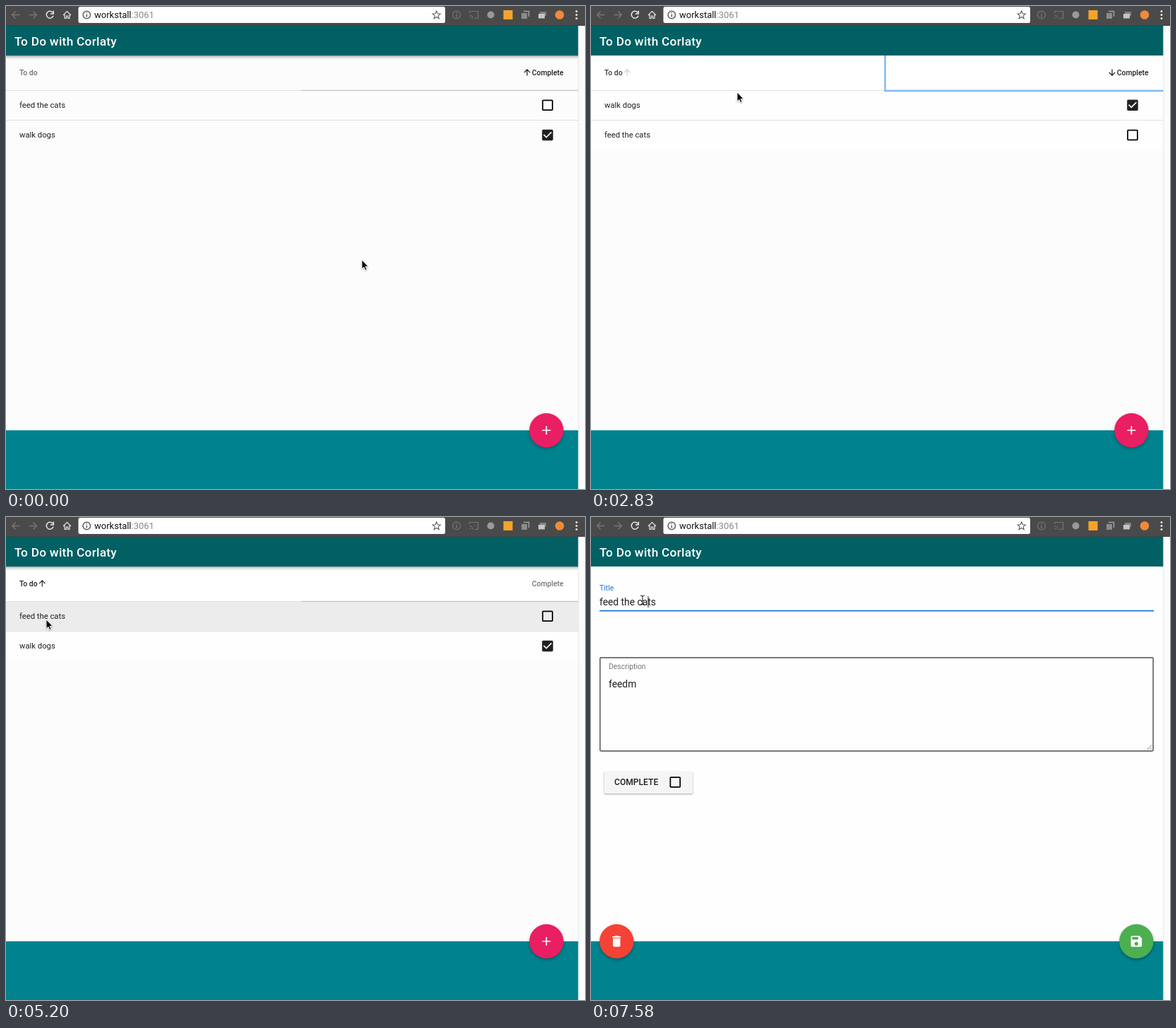
An HTML page that plays this animation: 820 by 683 pixels, repeating every 8 s.

```html
<!DOCTYPE html>
<html lang="en">
<head>
<meta charset="utf-8">
<title>To do list</title>
<style>
  html, body { margin: 0; width: 100%; height: 100%; overflow: hidden; background: #fcfcfc; }
  svg { display: block; width: 100%; height: 100%; }
  text { font-family: Roboto, Arial, sans-serif; fill: #212121; white-space: pre; }
  .cell { font-size: 11.25px; }
  .head { font-size: 10.4px; font-weight: 500; fill: #000; }
  .label { font-size: 10.4px; fill: #757575; }
  .input { font-size: 13.85px; }
  .line { fill: none; stroke-width: 1.5; }
  .fab { filter: drop-shadow(0 2px 2px rgba(0, 0, 0, .32)); }
</style>
</head>
<body>
<svg viewBox="0 0 820 683">
  <defs>
    <linearGradient id="shade" x2="0" y2="1">
      <stop stop-color="#000" stop-opacity=".38"/>
      <stop offset=".4" stop-color="#000" stop-opacity=".13"/>
      <stop offset="1" stop-color="#000" stop-opacity="0"/>
    </linearGradient>
    <g id="box"><path transform="translate(-10.4 -10.4) scale(.865)" d="M19 5v14H5V5h14m0-2H5c-1.1 0-2 .9-2 2v14c0 1.1.9 2 2 2h14c1.1 0 2-.9 2-2V5c0-1.1-.9-2-2-2z"/></g>
    <g id="ticked"><path transform="translate(-10.4 -10.4) scale(.865)" d="M19 3H5c-1.1 0-2 .9-2 2v14c0 1.1.9 2 2 2h14c1.1 0 2-.9 2-2V5c0-1.1-.9-2-2-2zm-9 14l-5-5 1.4-1.4L10 14.2l7.6-7.6L19 8l-9 9z"/></g>
    <path id="sort" d="M0 4.6V-4M-4.2 .2L0-4.1 4.2 .2" fill="none" stroke="#111" stroke-width="1.2"/>
  </defs>

  <rect width="820" height="683" fill="#fcfcfc"/>

  <g id="list">
    <rect id="headBack" y="70" width="811" height="50" fill="#fff"/>
    <rect id="rowsBack" y="120" width="811" height="84" fill="#fefefe"/>
    <rect id="hover1" y="120" width="811" height="41.5" fill="#ececec"/>
    <rect id="hover2" y="162" width="811" height="42" fill="#ececec"/>
    <path d="M0 119.5H811M0 161.5H811" stroke="#e0e0e0"/>
    <path d="M418 119.3H811" stroke="#bcbcbc"/>
    <text id="todoHead" class="head" x="19" y="98">To do</text>
    <use id="todoSort" href="#sort" x="0" y="0"/>
    <text id="doneHead" class="head" x="744.7" y="98">Complete</text>
    <use id="doneSort" href="#sort"/>
    <g id="cats"><text class="cell" x="19" y="144">feed the cats</text><use href="#box" x="767" y="140.2"/></g>
    <g id="dogs"><text class="cell" x="19" y="144">walk dogs</text><use href="#ticked" x="767" y="140.2" fill="#212121"/></g>
    <rect id="doneRing" x="416.5" y="60" width="400" height="60" fill="none" stroke="#82bcf6" stroke-width="2.6"/>
    <rect id="todoRing" x="-6" y="60" width="425.4" height="60.4" fill="none" stroke="#5f90ca" stroke-width="1.6"/>
    <rect id="shadow" y="70" width="811" height="6" fill="url(#shade)"/>
  </g>

  <g id="form">
    <rect y="70" width="811" height="530" fill="#fefefe"/>
    <text id="titleLabel" class="label" x="12" y="104">Title</text>
    <text class="input" x="12" y="125">feed the cats</text>
    <path d="M12 132.5H797" stroke="#707070"/>
    <path id="underline" stroke="#1976d2" stroke-width="1.8"/>
    <path id="caret" d="M81 112V128" stroke="#222"/>
    <rect x="12.8" y="198.8" width="783.4" height="132" rx="1.5" fill="none" stroke="#666" stroke-width="1.7"/>
    <text class="label" x="25" y="215">Description</text>
    <text class="input" x="25" y="241">feedm</text>
    <path d="M787.5 329L794 322.5M791.5 329L794 326.5" stroke="#777" stroke-width=".9"/>
    <rect x="18.5" y="360" width="125.5" height="31" rx="1.8" fill="#f5f5f5" style="filter:drop-shadow(0 1.5px 1.3px rgba(0,0,0,.35))"/>
    <text x="33" y="379.3" font-size="12.1" font-weight="500">COMPLETE</text>
    <use href="#box" x="119.3" y="375"/>
  </g>

  <rect y="28" width="811" height="42" fill="#006064"/>
  <text x="12" y="55.5" font-size="17.2" font-weight="500" letter-spacing=".3" style="fill:#fff">To Do with Corlaty</text>
  <rect y="600" width="811" height="83" fill="#00838f"/>
  <rect x="810.5" y="28" width="9.5" height="655" fill="#fcfcfc"/>
  <path d="M811 28V683" stroke="#e4e4e4"/>

  <g id="listButtons">
    <circle class="fab" cx="765.4" cy="600" r="24.2" fill="#e91e63"/>
    <path d="M759.4 600H771.4M765.4 594V606" stroke="#fff" stroke-width="1.7"/>
  </g>
  <g id="formButtons">
    <circle class="fab" cx="36.3" cy="600" r="24.2" fill="#f44336"/>
    <circle class="fab" cx="772.4" cy="600" r="24.2" fill="#4caf50"/>
    <path transform="translate(25.9 589.6) scale(.865)" fill="#fff" d="M6 19c0 1.1.9 2 2 2h8c1.1 0 2-.9 2-2V7H6v12zM19 4h-3.5l-1-1h-5l-1 1H5v2h14V4z"/>
    <path transform="translate(762 589.6) scale(.865)" fill="#fff" d="M17 3H5c-1.1 0-2 .9-2 2v14c0 1.1.9 2 2 2h14c1.1 0 2-.9 2-2V7l-4-4zm-5 16c-1.7 0-3-1.3-3-3s1.3-3 3-3 3 1.3 3 3-1.3 3-3 3zm3-10H5V5h10v4z"/>
  </g>

  <!-- browser bar -->
  <rect width="820" height="28" fill="#4a4a4a"/>
  <path d="M0 27.5H820" stroke="#404040"/>
  <rect x="102.5" y="1" width="519.5" height="23" rx="2.5" fill="#fff"/>
  <g class="line" stroke="#757575">
    <path d="M19.5 12.5H9M13.5 7.5L8.7 12.5 13.5 17.5M32.5 12.5H43M38.5 7.5L43.3 12.5 38.5 17.5"/>
    <circle cx="638" cy="12.5" r="5.4" stroke-width="1.2"/><path d="M638 11.5V16M638 9V10.3"/>
    <path d="M656.5 10V7.5H668.5V17.5H663.5M656.5 13A4.5 4.5 0 0 1 661 17.5M656.5 16A1.5 1.5 0 0 1 658 17.5" stroke-width="1.2"/>
  </g>
  <g class="line" stroke="#e8e8e8">
    <path d="M66.3 9.3A5 5 0 1 0 67 13.8M67.3 6.8V11H63"/>
    <path d="M81 13L86.5 7.5 92 13M83 12V17.5H85.4V14H87.6V17.5H90V12" stroke-width="1.2"/>
  </g>
  <g class="line" stroke="#5c5c5c" stroke-width="1.2">
    <circle cx="114.3" cy="12.5" r="5.2"/><path d="M114.3 11.7V15.5M114.3 9V10.3"/>
    <path d="M609.7 7L611.3 10.8 615.3 11.1 612.2 13.7 613.2 17.7 609.7 15.5 606.2 17.7 607.2 13.7 604.1 11.1 608.1 10.8Z" stroke-width="1.1"/>
  </g>
  <text x="125" y="17" font-size="13" style="fill:#111">workstall<tspan fill="#888">:3061</tspan></text>
  <circle cx="686.5" cy="12.5" r="5" fill="#9a9a9a"/>
  <rect x="704.5" y="6" width="13" height="13" fill="#f5a42a"/>
  <path d="M733 7.5H740.5V15" class="line" stroke="#a0a0a0"/><rect x="730" y="10" width="8" height="8" fill="#8b8b8b"/>
  <rect x="756" y="8" width="9" height="6" fill="#818181"/><rect x="754" y="11" width="9" height="6.5" fill="#c4c4c4"/>
  <circle cx="784" cy="12.5" r="6.3" fill="#f08a3c"/>
  <g fill="#e0e0e0"><circle cx="808" cy="7.5" r="1.5"/><circle cx="808" cy="12.5" r="1.5"/><circle cx="808" cy="17.5" r="1.5"/></g>

  <g id="cursor">
    <path id="arrow" d="M0 0V12.8L2.9 10.2 4.9 14.6 7 13.7 5.1 9.4H9Z" fill="#000" stroke="#fff" stroke-width=".9" style="filter:drop-shadow(0 1px 1px rgba(0,0,0,.3))"/>
    <g id="hand" stroke="#111" stroke-linejoin="round" stroke-linecap="round">
      <path d="M-1 .2C-.2-.8 1-.3 1.4.6L2.8 4.2C3.5 3.5 4.6 3.7 5 4.5 5.8 3.8 6.8 4.2 7.2 5 8.2 4.6 9 5.2 9.1 6.2L9.3 9.5 8 13.4H2.4L-1.5 9.2C-3 7.5-1.3 6.4 0 7.4L.7 7.8-1.2 2Z" fill="#fff" stroke-width="1.1"/>
      <path d="M3.3 8V11M5.2 8V11M7 8V11" stroke-width=".7"/>
    </g>
    <path id="beam" d="M-3-6Q0-6 0-4Q0-6 3-6M0-4V5M-3 7Q0 7 0 5Q0 7 3 7M-1.5 2H1.5" fill="none" stroke="#222" stroke-width="1.1"/>
  </g>
</svg>
<script>
const LOOP = 8000;
const el = Object.fromEntries([...document.querySelectorAll('[id]')].map(e => [e.id, e]));

// time, x, y, pointer shape
const pointer = [
  [0, 504, 359, 'arrow'], [150, 553, 333, 'arrow'], [450, 638, 291, 'arrow'],
  [600, 700, 232, 'arrow'], [740, 735, 178, 'arrow'], [890, 745, 148, 'arrow'],
  [1040, 743, 128, 'arrow'], [1340, 741, 100, 'hand'], [2380, 700, 108, 'hand'],
  [2530, 558, 119, 'arrow'], [2830, 207, 122, 'arrow'], [2980, 120, 127, 'arrow'],
  [3130, 76, 116, 'hand'], [3280, 56, 104, 'hand'], [3420, 47, 98, 'hand'],
  [4610, 48, 106, 'hand'], [4760, 53, 128, 'arrow'], [4900, 57, 145, 'arrow'],
  [5940, 62, 137, 'arrow'], [6090, 70, 122, 'beam'], [6240, 73, 117, 'beam']
];

const during = (t, from, to) => t >= from && t < to;
const ramp = (t, from, length = 300) => {
  const p = Math.min(1, Math.max(0, (t - from) / length));
  return 1 - (1 - p) ** 2;
};
const show = (node, on) => node.setAttribute('display', on ? 'inline' : 'none');
const fade = (node, amount) => node.setAttribute('opacity', amount);
const move = (node, x, y, turn = 0) =>
  node.setAttribute('transform', `translate(${x} ${y}) rotate(${turn})`);

function drawList(t) {
  const doneFocus = during(t, 1490, 3870);
  const todoFocus = during(t, 3870, 5050);
  const swapped = during(t, 1640, 4020);

  show(el.headBack, t >= 1490);
  show(el.rowsBack, t >= 740);
  show(el.doneRing, doneFocus);
  show(el.todoRing, todoFocus);
  show(el.shadow, !doneFocus && !todoFocus);
  fade(el.hover1, ramp(t, 890, 150) - ramp(t, 1340.1) + ramp(t, 4760));
  fade(el.hover2, ramp(t, 740, 150) - ramp(t, 890, 150));
  move(el.cats, 0, swapped ? 42.3 : 0);
  move(el.dogs, 0, swapped ? 0 : 42.3);

  const todoHover = ramp(t, 2700);
  fade(el.todoHead, .56 + .32 * todoHover);
  fade(el.todoSort, .3 * todoHover + .6 * ramp(t, 3930));
  move(el.todoSort, 51.3, 94);
  fade(el.doneHead, .87 - .33 * ramp(t, 3930));
  fade(el.doneSort, 1 - ramp(t, 3930, 200));
  move(el.doneSort, 738, 94, 180 * ramp(t, 1640));
}

function drawForm(t) {
  const focused = t >= 6390;
  const half = 392.5 * ramp(t, 6300, 240);
  el.titleLabel.style.fill = focused ? '#1976d2' : '#757575';
  show(el.underline, focused);
  el.underline.setAttribute('d', `M${404.5 - half} 132.6H${404.5 + half}`);
  show(el.caret, during(t, 6390, 6690) || t >= 7580);
}

function draw() {
  const t = performance.now() % LOOP;
  const editing = t >= 5350;
  for (const id of ['list', 'listButtons']) show(el[id], !editing);
  for (const id of ['form', 'formButtons']) show(el[id], editing);
  editing ? drawForm(t) : drawList(t);

  const [, x, y, shape] = pointer.findLast(step => step[0] <= t);
  move(el.cursor, x, y);
  for (const id of ['arrow', 'hand', 'beam']) show(el[id], id === shape);
  requestAnimationFrame(draw);
}
draw();
</script>
</body>
</html>
```
